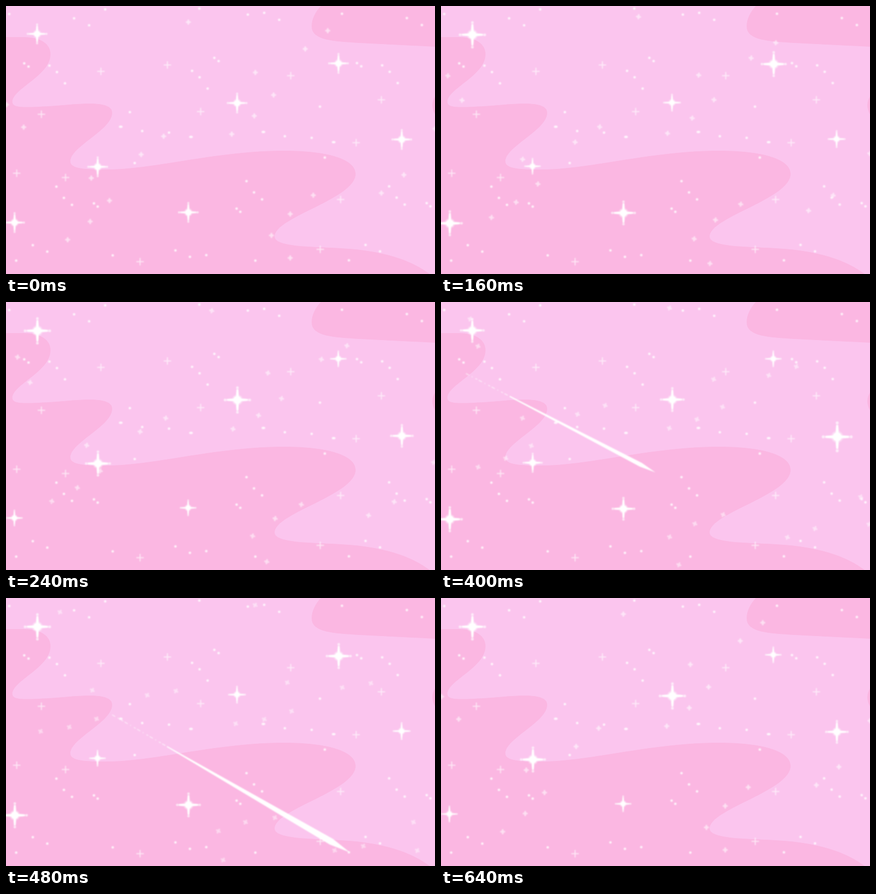
Animation, 800 px wide and 500 px high, one loop 720 ms. Source, as an HTML page:

```html
<!DOCTYPE html>
<html lang="en">
<head>
<meta charset="utf-8">
<title>Pink sky</title>
<style>
html, body { margin: 0; width: 100%; height: 100%; overflow: hidden; background: #fbc5ee; }
svg { display: block; width: 100%; height: 100%; }
</style>
</head>
<body>
<svg viewBox="0 0 800 500">
  <filter id="soft" filterUnits="userSpaceOnUse" x="-20" y="-20" width="840" height="540"
    color-interpolation-filters="sRGB"><feGaussianBlur stdDeviation=".8"/></filter>
  <rect width="800" height="500" fill="#fbc5ee"/>
  <g fill="#fbb7e2">
    <path d="M0 58H32C64 58 83 70 83 90C83 130 12 154 12 179C12 190 32 189 60 188C105 186 130 182 155 182C185 182 198 188 198 199C198 232 120 262 120 290C120 304 150 305 185 305C280 305 390 270 520 270C600 270 652 286 652 313C652 360 501 394 501 430C501 450 570 449 625 452C700 456 755 473 790 500H0Z"/>
    <path d="M587 0C577 11 570 24 570 38C570 64 610 66 660 69L800 76V0Z"/>
    <path d="M800 169Q790 185 800 202Z"/>
  </g>
  <g fill="#fff" stroke="none" filter="url(#soft)">
    <path id="dots" opacity=".85"/>
    <path id="crosses" stroke="#fff" stroke-width="2" opacity=".65"/>
    <path id="drift" stroke="#fff" stroke-width="3.2" stroke-linecap="round"/>
    <path id="dust" stroke="#fff" stroke-width="1.8" stroke-dasharray="7 5 2 6 4 3" opacity=".6"/>
    <path id="streak"/>
    <g id="stars"></g>
  </g>
</svg>
<script>
const $ = id => document.getElementById(id);
const STEP = 80, COUNT = 9;

const add = ([x, y], [a, b]) => [x + a, y + b];
const spread = (points, shifts) => points.flatMap(p => shifts.map(s => add(p, s)));

// Dots repeat along a row: each tile holds two copies of the motif
const TILE = [620.5, -0.5], HALF = [354.5, -10.2];
const tiled = points => spread(
  spread(points, [[0, 0], HALF]),
  [-1, 0, 1].map(n => TILE.map(v => v * n)));

const dots = tiled([
  [6, 15], [127, 23], [155, 36], [451, 16], [34, 107], [42, 113],
  [347, 121], [361, 133], [376, 154], [231, 198], [520, 243], [570, 246],
  [240, 293], [94, 337], [108, 358], [123, 371], [430, 378], [437, 384],
  [316, 456], [343, 468], [465, 475], [19, 475]
]);
const dashes = tiled([[480, 235], [611, 254]]);

const oval = (rx, ry) => ([x, y]) =>
  `M${x - rx} ${y}a${rx} ${ry} 0 1 0 ${2 * rx} 0a${rx} ${ry} 0 1 0 ${-2 * rx} 0`;
$("dots").setAttribute("d",
  [...dots.map(oval(2.4, 2.3)), ...dashes.map(oval(3.5, 2.2))].join(""));

const plus = r => ([x, y]) => `M${x - r} ${y}h${2 * r}M${x} ${y - r}v${2 * r}`;
$("crosses").setAttribute("d", [
  [177, 122], [301, 110], [531, 130], [363, 197], [66, 202], [700, 175],
  [653, 255], [20, 312], [111, 320], [624, 361], [586, 454], [250, 477]
].map(plus(7)).join(""));

// Drifting field: one chain used twice, plus loose stars
const chain = [[0, 0], [42, -34], [78, -73], [137, -159], [179, -193], [44, -115]];
const drifters = [
  ...spread([[115, 436], [421, 239]], chain),
  [340, 30], [573, 353], [530, 388], [495, 428], [530, 470], [742, 315],
  [700, 349], [800, 229], [33, 226], [1, 184], [833, 271]
];
$("drift").setAttribute("d", drifters.map(plus(3.4)).join(""));

// Degrees turned: steady at first, then rushing
const turn = k => 3.6 * k + 20.8 * (k / 7) ** 5.5;

// Twinkling stars: place, then size in the second, third and last pose
const REST = 19.5;
const stars = [
  [58, 52, 23, 25, 25], [620, 107, 16, 24, 16], [431, 181, 23, 17, 25],
  [738, 249, 28, 17, 22], [171, 300, 19, 16, 24], [340, 385, 22, 23, 16],
  [16, 404, 24, 24, 16]
];

function sparkle([x, y, ...sizes], pose) {
  const s = [REST, ...sizes][pose];
  const grow = s - REST;
  const ray = s * 0.8, w = s * 0.095, core = s * 0.3;
  const arm = a => `<g transform="rotate(${a})">` +
    `<path d="M0 ${-w}H${ray * 0.6}L${ray} ${-w * 0.7}V${w * 0.7}L${ray * 0.6} ${w}H0Z"/>` +
    `<circle cx="${s - 2}" r="${s * 0.1}" opacity=".7"/></g>`;
  return `<g transform="translate(${x + grow * 0.1} ${y + grow * 0.3})">` +
    [0, 90, 180, 270].map(arm).join("") +
    `<circle r="${core * 1.35}" opacity=".35"/><circle r="${core}"/></g>`;
}

// Meteor: head and tail each follow a gently bending course
const course = (a, b, c) => u => a + b * u + c * u * u;
const headX = course(400, 238, 3), headY = course(318, 146, 10.5);
const tailX = course(128, 165, 7), tailY = course(176, 95, 6);

function drawMeteor(k) {
  const visible = k >= 4 && k <= 7;
  for (const id of ["dust", "streak"])
    $(id).setAttribute("visibility", visible ? "visible" : "hidden");
  if (!visible) return;
  const u = k - 5;
  const x = tailX(u), y = tailY(u), dx = headX(u) - x, dy = headY(u) - y;
  const len = Math.hypot(dx, dy), half = 4 * 1.5 ** u;
  const at = (f, side) => `${x + dx * f - dy / len * side} ${y + dy * f + dx / len * side}`;
  $("dust").setAttribute("d", `M${at(-0.3, 0)}L${at(0, 0)}`);
  $("streak").setAttribute("d", `M${at(0, -1)}L${at(0.5, -half * 0.65)}L${at(0.9, -half)}` +
    `L${at(1, 0)}L${at(0.9, half)}L${at(0.5, half * 0.65)}L${at(0, 1)}Z`);
}

function draw(k) {
  const last = k === COUNT - 1;
  const angle = last ? 0 : turn(k);
  $("drift").setAttribute("transform", `rotate(${angle} 433 250)`);
  $("drift").setAttribute("opacity", 0.6 - angle * 0.004);
  const pose = last ? 3 : k % 4;
  $("stars").innerHTML = stars.map(s => sparkle(s, pose)).join("");
  drawMeteor(k);
}

const start = performance.now();
let shown = -1;
function tick(now) {
  const k = Math.floor(Math.max(0, now - start) / STEP) % COUNT;
  if (k !== shown) draw(shown = k);
  requestAnimationFrame(tick);
}
tick(start);
</script>
</body>
</html>
```
